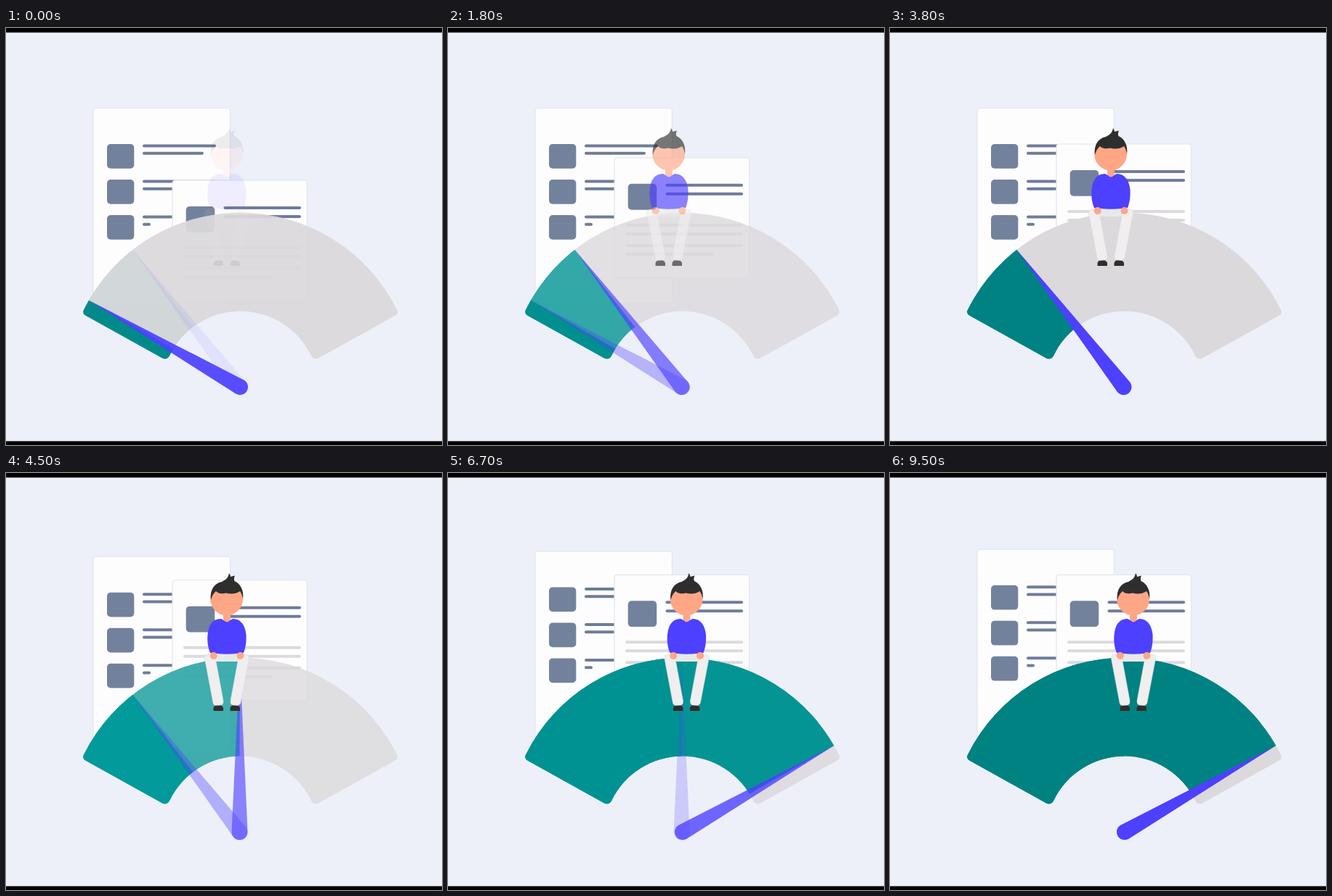
Recreate the animation shown at these times as an HTML page. Size 600x575 px, loop 9600 ms.

```html
<!DOCTYPE html>
<html lang="en">
<head>
<meta charset="utf-8">
<title>Gauge</title>
<style>
html, body { margin: 0; width: 100%; height: 100%; overflow: hidden; background: #edf0f9; }
svg { display: block; width: 100vw; height: 100vh; }
</style>
</head>
<body>
<svg viewBox="0 0 600 575" preserveAspectRatio="none">
  <defs>
    <path id="arc" d="M107.5 387.5Q104 393.5 110 396.8L215 455.2Q221 458.5 225 452A108 108 0 0 1 420 452Q424 458.5 430 455.2L535 396.8Q541 393.5 537.5 387.5A240.4 240.4 0 0 0 107.5 387.5Z"/>
  </defs>
  <rect width="600" height="575" fill="#edf0f9"/>
  <g id="back"></g>
  <g id="front"></g>
  <use id="gray" href="#arc" fill="#dbd9db"/>
  <g id="fills"></g>
  <g id="needles" fill="#4d40ff"></g>
  <g id="man">
    <path d="M274 251Q304 246 334 251L333 260H275Z" fill="#e9e8ea"/>
    <g fill="#332b2c">
      <path d="M285.5 328V324Q287 319.5 292 319.5T299 324V328Z"/>
      <path d="M308.5 328V324Q310 319.5 315 319.5T322 324V328Z"/>
    </g>
    <g fill="#f0eeef" stroke="#dedcdf" stroke-width=".6">
      <path d="M273.5 256Q273 250 280 250Q287 250 288.5 257L299 314Q299.5 319 296 320L288 320.5Q285.5 320 285 317Z"/>
      <path d="M334.5 256Q335 250 328 250Q321 250 319.5 257L309 314Q308.5 319 312 320L319 320.5Q322 320 322.8 317Z"/>
    </g>
    <path d="M296 201C284 201 279 210 277.6 222C276.5 232 278 241 281 248L290 249Q304 250.5 318 249L327 248C330.5 239 331 230 330.4 222C329 210 323 201 312 201Q304 207 296 201Z" fill="#4d40ff"/>
    <g fill="#ffa685">
      <path d="M299 190H309V202Q304 209 299 202Z"/>
      <circle cx="303.6" cy="174" r="22.4"/>
      <circle cx="285.7" cy="252" r="5"/>
      <circle cx="322.5" cy="252" r="5"/>
    </g>
    <path d="M282 175C280 161 287 152 297 150C303 147 306 144 307 138Q309 141 309 143L315 141.5Q313 146 314.5 149C322 152 328 162 326 174Q325 167 322 163C316 167 309 167 303 165.5Q294 168 289 163Q284 167 282 175Z" fill="#2d2f2f"/>
  </g>
  <rect width="600" height="6.3"/>
  <rect y="569.7" width="600" height="5.3"/>
</svg>
<script>
const NS = 'http://www.w3.org/2000/svg';
const $ = id => document.getElementById(id);

function add(parent, tag, attrs) {
  const el = document.createElementNS(NS, tag);
  for (const k in attrs) el.setAttribute(k, attrs[k]);
  parent.appendChild(el);
  return el;
}

const box = (g, x, y, width, height, rx, fill) =>
  add(g, 'rect', { x, y, width, height, rx, fill });
const bar = (g, x, y, w, fill = '#6f7c99') => box(g, x, y - 2, w, 4, 2, fill);

function sheet(g, x, w, h) {
  const r = box(g, x, 0, w, h, 4, '#fefdfe');
  r.setAttribute('stroke', '#e3e5ec');
  r.setAttribute('stroke-width', 1.2);
}

// Cards are drawn with their top edge at zero
const back = $('back'), front = $('front');
sheet(back, 120, 188.5, 269);
[0, 49, 98].forEach((y, i) => {
  box(back, 139, 49.5 + y, 37.3, 33.8, 5, '#73829c');
  bar(back, 188, 52 + y, 101);
  bar(back, 188, 62.3 + y, i < 2 ? 84 : 11);
});
sheet(front, 229, 185.5, 166);
box(front, 247.7, 36, 39.5, 35.8, 5, '#73829c');
bar(front, 299.5, 38, 106.5);
bar(front, 299.5, 50, 106.5);
[93, 105, 121, 133].forEach((y, i) =>
  bar(front, 244, y, i < 3 ? 162 : 122, '#dcdadd'));

// One stop per gauge position: pivot x, tip, tops of both cards, man's shift
const PY = 495, R = 11;
const stops = [
  { px: 322, x: 114, y: 375.5, back: 110.5, front: 214.3, man: 0 },
  { px: 321.5, x: 175.5, y: 307, back: 110.5, front: 160, man: 0 },
  { px: 321.5, x: 321.8, y: 258, back: 118, front: 140.3, man: 0 },
  { px: 323, x: 531, y: 376, back: 105.3, front: 140.3, man: 31 }
];

stops.forEach((s, i) => {
  const dx = s.x - s.px, dy = s.y - PY, len = Math.hypot(dx, dy);
  const nx = -dy / len * R, ny = dx / len * R;
  const far = [s.px + dx * 1.4, PY + dy * 1.4];
  const pts = [[s.px, PY], far];
  if (i) pts.push([i < 3 ? far[0] : 620, 150], [0, 150]);
  pts.push([0, 575], [s.px, 575]);
  const clip = add(document.querySelector('defs'), 'clipPath', { id: 'cut' + i });
  add(clip, 'polygon', { points: pts.join(' ') });
  s.fill = add($('fills'), 'use', { href: '#arc', 'clip-path': `url(#cut${i})` });
  $('fills').prepend(s.fill);
  s.needle = add($('needles'), 'path', {
    d: `M${s.x} ${s.y}L${s.px + nx} ${PY + ny}A${R} ${R} 0 1 1 ${s.px - nx} ${PY - ny}Z`
  });
});

const LOOP = 9600, STEP = 100;
const clamp = v => Math.max(0, Math.min(1, v));
const mix = (a, b, p) => a + (b - a) * p;
const smooth = v => v * v * (3 - 2 * v);
const easeOut = u => 1 - Math.pow(1 - clamp(u), 1.7);

// The first change is slow and already under way when the loop begins
const keys = [[0, .08], [1200, .42], [2400, .885], [2850, 1]];
function slowIn(t) {
  for (let i = 1; i < keys.length; i++) {
    const [t0, a] = keys[i - 1], [t1, b] = keys[i];
    if (t < t1) return mix(a, b, (t - t0) / (t1 - t0));
  }
  return 1;
}

function phase(t) {
  if (t < 3890) return [0, slowIn(t)];
  if (t < 5860) return [1, easeOut((t - 3890) / 1400)];
  return [2, easeOut((t - 5860) / 1400)];
}

const teal = lift => {
  const v = Math.round(130 + 100 * lift);
  return `rgb(0,${v},${v})`;
};

function draw(t) {
  const [i, p] = phase(t);
  const a = stops[i], b = stops[i + 1], q = p * (1 - p);
  const at = k => mix(a[k], b[k], p);

  back.setAttribute('transform', `translate(0 ${at('back')})`);
  front.setAttribute('transform', `translate(0 ${at('front')})`);
  $('man').setAttribute('transform', `translate(${at('man')} 0)`);
  $('man').setAttribute('opacity', i ? 1 : p);
  $('gray').setAttribute('opacity', 1 - q);

  for (const s of stops) {
    s.fill.setAttribute('opacity', 0);
    s.needle.setAttribute('opacity', 0);
  }
  a.fill.setAttribute('opacity', 1 - q * .15);
  a.fill.setAttribute('fill', teal(i ? q : q * (1 - p * p)));
  b.fill.setAttribute('opacity', Math.max(Math.min(p, .05), smooth(clamp((p - .2) / .65))));
  b.fill.setAttribute('fill', teal(q));
  a.needle.setAttribute('opacity', 1 - p);
  b.needle.setAttribute('opacity', p);
}

const start = performance.now();
function tick() {
  const t = (performance.now() - start) % LOOP;
  draw(Math.floor(t / STEP) * STEP);
  requestAnimationFrame(tick);
}
draw(0);
requestAnimationFrame(tick);
</script>
</body>
</html>
```
